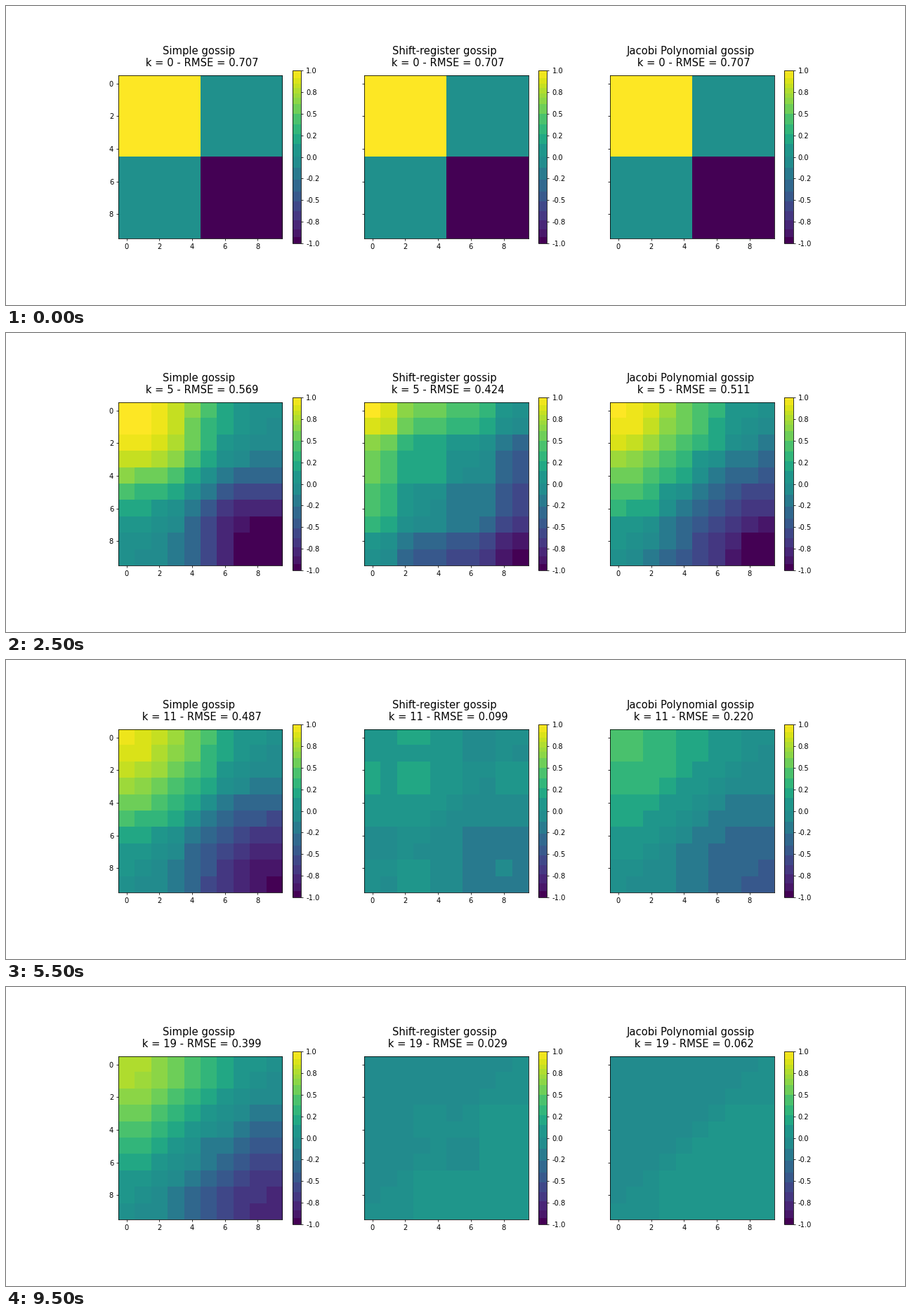
A matplotlib script that plays this animation: 1280 px wide and 427 px high, repeating every 10 s.

```python
import numpy as np
import matplotlib.pyplot as plt
from matplotlib.animation import FuncAnimation
from matplotlib.colors import ListedColormap

SIZE = 10
STEPS = 20
DPI = 1280 / 18
EPS = 1e-6  # keeps the pixel size from rounding down

# First viridis index of each colour band; zero has a thin band of its own.
BAND_STARTS = [0, 9, 21, 34, 48, 62, 77, 94, 112, 128, 130, 147, 162, 176,
               192, 207, 216, 222, 230, 237, 245, 253]


def banded_viridis(values):
    """Viridis in flat bands, each coloured by the median value inside it."""
    viridis = plt.get_cmap("viridis")
    used = np.clip((np.ravel(values) + 1 + EPS) * 128, 0, 255).astype(int)
    used = np.concatenate([used, np.arange(256)])
    colors = []
    for start, end in zip(BAND_STARTS, BAND_STARTS[1:] + [256]):
        inside = used[(used >= start) & (used < end)]
        colors += [viridis(int(np.median(inside)))] * (end - start)
    return ListedColormap(colors)


def average(x):
    """One gossip round on the grid: W = I - L / 4."""
    p = np.pad(x, 1, mode="edge")
    return (p[:-2, 1:-1] + p[2:, 1:-1] + p[1:-1, :-2] + p[1:-1, 2:]) / 4


def simple(x0):
    states = [x0]
    while len(states) < STEPS:
        states.append(average(states[-1]))
    return states


def shift_register(x0):
    gap = (1 - np.cos(np.pi / SIZE)) / 2
    omega = 2 / (1 + np.sqrt(gap * (1 - gap / 4)))
    states = [x0, average(x0)]
    while len(states) < STEPS:
        states.append(omega * average(states[-1]) + (1 - omega) * states[-2])
    return states


def jacobi(x0, d=2):
    h = d / 2
    a, b = (d + 4) / (2 * (2 + d)), d / (2 * (2 + d))
    states = [x0, a * average(x0) + b * x0]
    for t in range(1, STEPS - 1):
        q, s = (t + 1 + h) ** 2, 2 * t + h
        a = (s + 1) * (s + 2) / (2 * q)
        b = d ** 2 * (s + 1) / (8 * q * s)
        c = t ** 2 * (s + 2) / (q * s)
        states.append(a * average(states[-1]) + b * states[-1] - c * states[-2])
    return states


side = np.where(np.arange(SIZE) < SIZE // 2, 1.0, -1.0)
start = (side[:, None] + side[None, :]) / 2
runs = {
    "Simple gossip": simple(start),
    "Shift-register gossip": shift_register(start),
    "Jacobi Polynomial gossip": jacobi(start),
}

plt.rcParams["font.family"] = "DejaVu Sans"
fig, axes = plt.subplots(1, 3, sharey=True, dpi=DPI,
                         figsize=((1280 + EPS) / DPI, (427 + EPS) / DPI))
cmap = banded_viridis(list(runs.values()))
images = []
for ax in axes:
    image = ax.imshow(start, cmap=cmap, vmin=-1, vmax=1, interpolation="nearest")
    ax.set_xticks(range(0, SIZE, 2))
    ax.set_yticks(range(0, SIZE, 2))
    fig.colorbar(image, ax=ax, shrink=0.75, format="%.1f",
                 ticks=np.linspace(-1, 1, 9))
    images.append(image)


def update(k):
    for ax, image, (name, states) in zip(axes, images, runs.items()):
        x = states[k]
        rmse = np.sqrt(np.mean(x ** 2))
        image.set_data(x + 1e-9)  # rounding noise must not push zero down a band
        ax.set_title(f"{name} \n k = {k} - RMSE = {rmse:.3f}",
                     fontsize=15, pad=12.7)
    return images


anim = FuncAnimation(fig, update, frames=STEPS, interval=500,
                     repeat=True, repeat_delay=0, blit=False)
plt.show()
```
